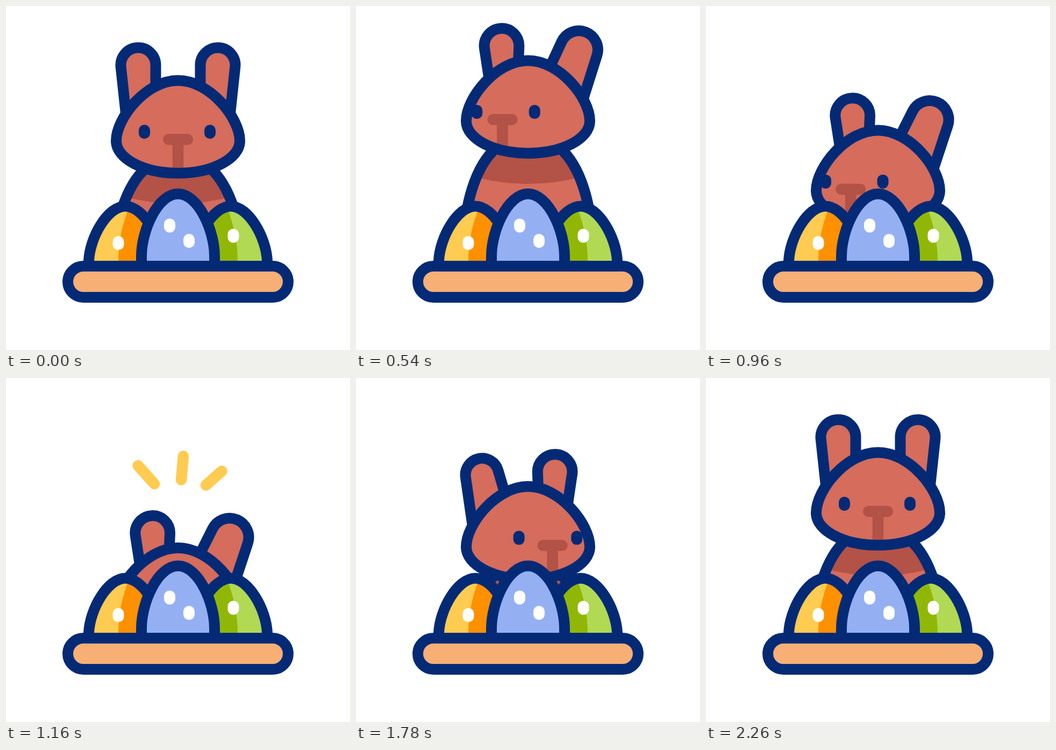
An HTML page that plays this animation: 640x640 px, repeating every 2.4 s.

```html
<!DOCTYPE html>
<html lang="en">
<head>
<meta charset="utf-8">
<title>Bunny behind eggs</title>
<style>
  html, body { margin: 0; width: 100%; height: 100%; overflow: hidden; background: #fff; }
  svg { display: block; width: 100vw; height: 100vh; }
  .line { stroke: #042a76; stroke-width: 20; stroke-linejoin: round; }
  .fur { fill: #d56c5c; }
  .shade { fill: #b35247; }
  .spark { stroke: #ffcb50; stroke-width: 20.5; stroke-linecap: round; }
</style>
</head>
<body>
<svg viewBox="0 0 640 640">
  <defs>
    <clipPath id="stage"><rect width="640" height="520"/></clipPath>
    <path id="side" d="M154 490V474C156 430 189 372.5 222 372.5S288 430 290 474V490Z"/>
    <path id="half" d="M229 374Q209 425 209 474V490H290V474C288 430 255 372.5 229 374Z"/>
    <rect id="dot" x="-10.5" y="-13" width="21" height="26" rx="10.2"/>
  </defs>

  <g id="sparks"></g>

  <g clip-path="url(#stage)">
    <g id="bunny">
      <path class="fur" d="M201 480C201 410 221 335 262 300H378C419 335 439 410 439 480Z"/>
      <path class="shade" d="M262 300L236 332L222 355Q320 381 418 355L404 332L378 300Z"/>
      <path class="line" fill="none" d="M201 480C201 410 221 335 262 300H378C419 335 439 410 439 480Z"/>
      <path id="earL" class="fur line"/>
      <path id="earR" class="fur line"/>
      <path id="head" class="fur" d="M320 138.5C379 138.5 435 208 435 251C435 284 384 311 320 311S205 284 205 251C205 208 261 138.5 320 138.5Z"/>
      <g id="nose" class="shade">
        <rect x="-28" y="238" width="56" height="20.5" rx="10.2"/>
        <rect x="-10.3" y="248" width="20.6" height="58"/>
      </g>
      <use href="#dot" id="eyeL" fill="#042a76"/>
      <use href="#dot" id="eyeR" fill="#042a76"/>
      <path class="line" fill="none" d="M320 138.5C379 138.5 435 208 435 251C435 284 384 311 320 311S205 284 205 251C205 208 261 138.5 320 138.5Z"/>
    </g>
  </g>

  <g>
    <use href="#side" fill="#ffcb50"/>
    <use href="#half" fill="#ff9000"/>
    <use href="#side" class="line" fill="none"/>
    <use href="#dot" x="209" y="441" fill="#fff"/>
  </g>
  <g transform="matrix(-1 0 0 1 640 0)">
    <use href="#side" fill="#b1d953"/>
    <use href="#half" fill="#91b706"/>
    <use href="#side" class="line" fill="none"/>
    <use href="#dot" x="217" y="427.5" fill="#fff"/>
  </g>
  <path class="line" fill="#94b0f3" d="M252 490V466C252 418 282 349.5 320 349.5S388 418 388 466V490Z"/>
  <use href="#dot" x="304.5" y="408.5" fill="#fff"/>
  <use href="#dot" x="340.5" y="437" fill="#fff"/>
  <rect class="line" x="115" y="484" width="410" height="58" rx="29" fill="#f7af75"/>
</svg>

<script>
const LOOP = 2400;
const $ = id => document.getElementById(id);

// Ear: tip centre x, y, tip radius, left foot x, y, right foot x, y
const rest = {
  earL: [246, 110, 32.5, 223, 200, 278.5, 170],
  earR: [394, 110, 32.5, 361.5, 170, 417, 200],
  face: [257.5, 379.5, 320]   // left eye, right eye, nose
};
const lookLeft = {
  earL: [272.7, 111, 32.3, 253, 195, 302.5, 170],
  earR: [416, 119, 35.5, 355.7, 160, 422, 214],
  face: [222.5, 329, 269.3]
};
const lookRight = {
  earL: [233.2, 117.8, 30.8, 215.5, 208, 281.5, 165],
  earR: [367.3, 111, 32.3, 337.5, 170, 387, 195],
  face: [308.5, 414.5, 371]
};

// Sparks: inner x, y, outer x, y
const sparkLines = [
  [311, 236, 238.5, 155],
  [321.6, 240, 330.8, 135],
  [338, 229.5, 408.5, 167]
].map(pts => {
  const el = document.createElementNS('http://www.w3.org/2000/svg', 'line');
  el.setAttribute('class', 'spark');
  $('sparks').append(el);
  return { el, pts };
});

const mix = (a, b, k) => a + (b - a) * k;
const mixAll = (a, b, k) => a.map((v, i) => mix(v, b[i], k));
const part = (t, from, to) => Math.min(1, Math.max(0, (t - from) / (to - from)));
const soft = p => p * p * (3 - 2 * p);
const strong = p => p < 0.5 ? 4 * p ** 3 : 1 - 4 * (1 - p) ** 3;

// Two lines from the feet, tangent to the round tip
function earPath([cx, cy, r, lx, ly, rx, ry]) {
  const touch = (x, y, side) => {
    const dx = x - cx, dy = y - cy;
    return Math.atan2(dy, dx) + side * Math.acos(r / Math.hypot(dx, dy));
  };
  const at = a => (cx + r * Math.cos(a)).toFixed(2) + ' ' + (cy + r * Math.sin(a)).toFixed(2);
  const a = touch(lx, ly, 1), b = touch(rx, ry, -1);
  const large = b + 2 * Math.PI - a > Math.PI ? 1 : 0;
  return `M${lx} ${ly}L${at(a)}A${r} ${r} 0 ${large} 1 ${at(b)}L${rx} ${ry}`;
}

function height(t) {
  if (t < 705) return mix(0, -39, strong(part(t, 0, 705)));
  if (t < 1300) return mix(-39, 177.5, strong(part(t, 705, 1180)));
  return mix(177.5, 0, strong(part(t, 1380, 2105)));
}

function draw(t) {
  const left = soft(part(t, 0, 640));
  const right = soft(part(t, 1200, 1625));
  const back = soft(part(t, 1660, 2260));
  const pose = key => mixAll(
    mixAll(mixAll(rest[key], lookLeft[key], left), lookRight[key], right),
    rest[key], back);

  $('bunny').setAttribute('transform', `translate(0 ${height(t).toFixed(2)})`);
  $('earL').setAttribute('d', earPath(pose('earL')));
  $('earR').setAttribute('d', earPath(pose('earR')));
  const [eyeL, eyeR, nose] = pose('face');
  $('eyeL').setAttribute('transform', `translate(${eyeL} 234)`);
  $('eyeR').setAttribute('transform', `translate(${eyeR} 234)`);
  $('nose').setAttribute('transform', `translate(${nose} 0)`);

  const tip = soft(part(t, 968, 1208));
  const tail = soft(part(t, 1044, 1284));
  for (const { el, pts: [x0, y0, x1, y1] } of sparkLines) {
    el.style.display = tip > tail ? '' : 'none';
    el.setAttribute('x1', mix(x0, x1, tail));
    el.setAttribute('y1', mix(y0, y1, tail));
    el.setAttribute('x2', mix(x0, x1, tip));
    el.setAttribute('y2', mix(y0, y1, tip));
  }
}

const start = performance.now();
function tick() {
  draw((performance.now() - start) % LOOP);
  requestAnimationFrame(tick);
}
tick();
</script>
</body>
</html>
```
